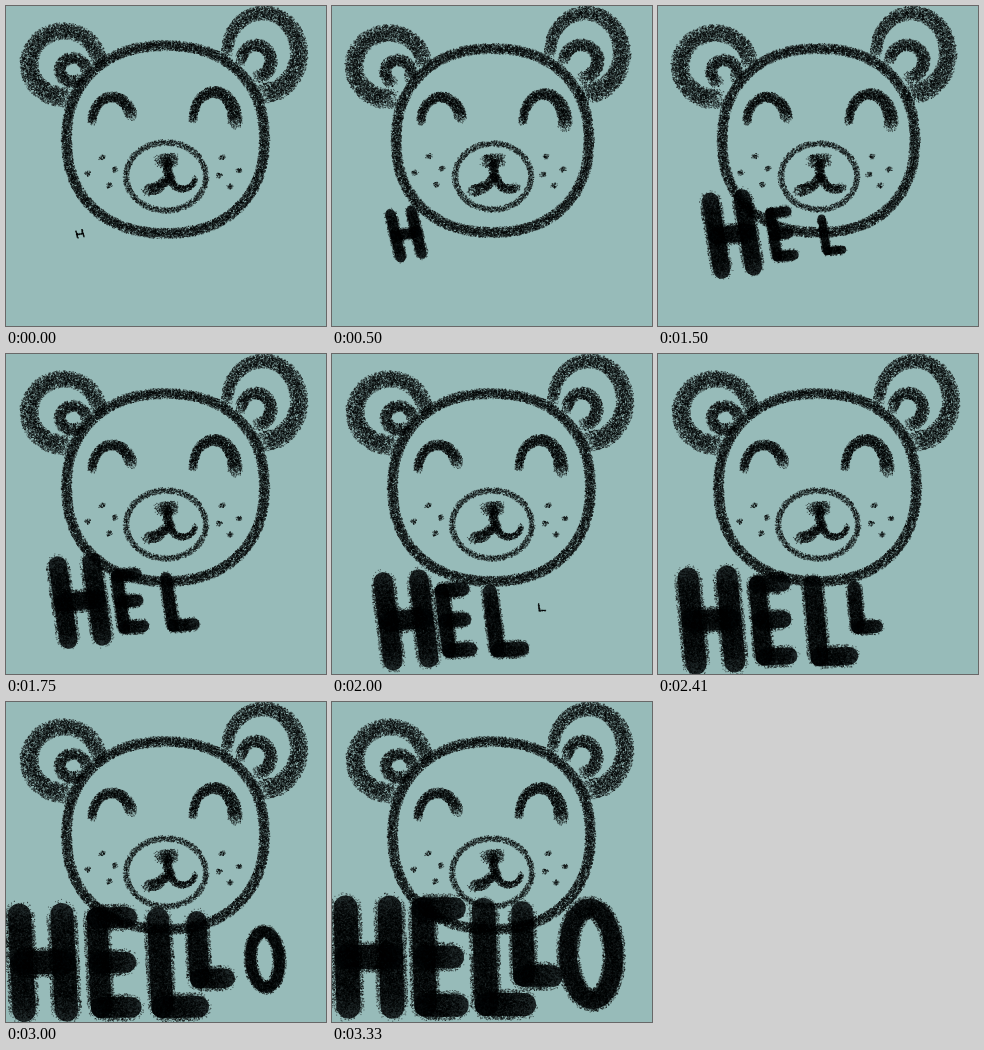
These frames come from a looping animation (320x320 px, 10000 ms). An HTML page with a canvas:

```html
<!DOCTYPE html>
<html lang="en">
<head>
<meta charset="utf-8">
<title>Bear says hello</title>
<style>
  html, body { margin: 0; width: 100%; height: 100%; overflow: hidden; background: #97bbb9; }
  canvas { display: block; width: 100vw; height: 100vh; }
</style>
</head>
<body>
<canvas id="stage" width="320" height="320"></canvas>
<script>
const SIZE = 320, LOOP = 10000, LAST = 40, GROWN = 39;
const PAPER = '#97bbb9', INK = '#020405', PI = Math.PI;
const ctx = document.getElementById('stage').getContext('2d');

const mix = (a, b, k) => a + (b - a) * k;
const ramp = (from, to, x) => Math.min(1, Math.max(0, (x - from) / (to - from)));

function random(seed) {
  return () => {
    seed = (seed + 0x6D2B79F5) | 0;
    let t = Math.imul(seed ^ (seed >>> 15), 1 | seed);
    t = (t + Math.imul(t ^ (t >>> 7), 61 | t)) ^ t;
    return ((t ^ (t >>> 14)) >>> 0) / 4294967296;
  };
}

// Part of an ellipse; a power below 1 makes it squarer
function arc(cx, cy, rx, ry, from = 0, to = 2 * PI, power = 1) {
  const bend = v => Math.sign(v) * Math.abs(v) ** power;
  return Array.from({ length: 49 }, (_, i) => {
    const a = mix(from, to, i / 48);
    return [cx + rx * bend(Math.cos(a)), cy + ry * bend(Math.sin(a))];
  });
}

// Grainy stroke: faint specks scattered in a disc that follows the path
function brush(g, rnd, pts, w0, w1 = w0, density = 3) {
  g.globalAlpha = 0.55;
  for (let i = 1; i < pts.length; i++) {
    const [x0, y0] = pts[i - 1], [x1, y1] = pts[i];
    const w = mix(w0, w1, i / pts.length);
    const count = Math.hypot(x1 - x0, y1 - y0) * w * density + rnd();
    for (let n = 1; n < count; n++) {
      const k = rnd(), a = rnd() * 2 * PI, r = w * 0.54 * Math.sqrt(rnd());
      g.fillRect(mix(x0, x1, k) + r * Math.cos(a) - 0.5, mix(y0, y1, k) + r * Math.sin(a) - 0.5, 1, 1);
    }
  }
  g.globalAlpha = 1;
}

// Sway is 0 or 1: the two drawings that alternate
function drawBear(sway) {
  const sheet = document.createElement('canvas');
  sheet.width = sheet.height = SIZE;
  const g = sheet.getContext('2d'), rnd = random(11 + sway);
  const stroke = (pts, ...look) => brush(g, rnd, pts, ...look);
  const s = (still, swayed) => mix(still, swayed, sway);
  g.fillStyle = PAPER;
  g.fillRect(0, 0, SIZE, SIZE);
  g.fillStyle = INK;

  // Head
  stroke(arc(s(159.5, 160.5), s(133.5, 134.5), s(99, 96.5), s(94, 92), 0, 2 * PI, 0.9), 10, 10, 2.4);

  // Ears
  stroke(arc(s(58, 57), s(58, 60), 35, 33, -0.1, -4.8), 15, 19, 2);
  stroke(arc(s(257, 254), 47, 36, 40, PI, 2.5 * PI), 11, 20, 2);
  stroke(arc(s(67, 66), s(64, 66), 13, 12, s(0, 0.5), s(-5.4, -4.2)), 11, 12, 2.4);
  stroke(arc(s(250, 249), 55, s(15, 17), 16, PI, 2.45 * PI), 11, 13, 2.4);

  // Eyes
  stroke(arc(s(106, 109), 116, 20, 25, PI, s(2 * PI - 0.3, 2 * PI - 0.15)), 8, 12);
  stroke(arc(s(208, 212), s(114, 116), 21, 28, PI, 2 * PI + 0.1), 8, 14);

  // Muzzle, nose and mouth
  stroke(arc(s(160, 161), 170.5, s(40, 38), s(34, 33)), 6, 6, 1.6);
  stroke([[154, 155], [168, 154]], 13);
  stroke([[163, 156], [161, 164], [164, 173]], 9);
  stroke([[163, 171], [153, 181], [141, 185]], 8, 13);
  stroke(arc(177, 172, 12, 11, PI, s(0, 0.9)), 8, s(5, 9));

  // Freckles
  const cheek = (pts, dx) => pts.forEach(([x, y]) =>
    stroke([[x + dx * sway - 1, y - sway], [x + dx * sway + 1, y - sway - 1]], 5, 5, 4));
  cheek([[96, 152], [82, 168], [103, 180], [109, 164]], 1);
  cheek([[216, 152], [213, 170], [233, 165], [224, 181]], -2);
  return sheet;
}

// Letter strokes in a unit box around 0,0
const line = (...p) => [[p[0], p[1]], [p[2], p[3]]];
const stem = line(-0.5, -0.5, -0.5, 0.5), foot = line(-0.5, 0.5, 0.5, 0.5);
const shapes = {
  H: [stem, line(0.5, -0.5, 0.5, 0.5), line(-0.5, 0, 0.5, 0)],
  E: [stem, line(-0.5, -0.5, 0.5, -0.5), line(-0.5, 0, 0.4, 0), foot],
  L: [stem, foot],
  O: [arc(0, 0, 0.5, 0.5)]
};

// Each letter is born 8 steps after the one before it
const word = [
  { char: 'H', from: 74, to: 37, rise: 0, w: 44, h: 99, pen: 30, ease: 0.5 },
  { char: 'E', from: 124, to: 108, rise: 0, w: 32, h: 97, pen: 28, ease: 0.8 },
  { char: 'L', from: 174, to: 172, rise: 0, w: 38, h: 95, pen: 29, ease: 0.5 },
  { char: 'L', from: 210, to: 205, rise: 13, w: 28, h: 64, pen: 27, ease: 0.5 },
  { char: 'O', from: 257, to: 259, rise: 3, w: 46, h: 93, pen: 22, ease: 1 }
];

function drawLetter(letter, index, step) {
  const born = index * 8;
  if (step < born) return;
  const grow = ramp(born, GROWN, step) ** letter.ease;
  const w = mix(6, letter.w, grow), h = mix(7, letter.h, grow), pen = mix(1.5, letter.pen, grow);
  const early = 1 - step / GROWN, lean = 0.03 + 0.25 * early, tilt = -0.2 * early;
  const cx = mix(letter.from, letter.to, ramp(24, 33, step));
  const cy = 228 + 38 * ramp(18, 24, step) - 11 * ramp(33, GROWN, step) - letter.rise;
  const rnd = random(step * 7 + index * 997);

  for (const part of shapes[letter.char]) {
    const pts = part.map(([u, v]) => [cx + u * w + v * h * lean, cy + u * w * tilt + v * h]);
    ctx.globalAlpha = 0.8;
    ctx.lineWidth = pen * 0.8;
    ctx.beginPath();
    pts.forEach(([x, y]) => ctx.lineTo(x, y));
    ctx.stroke();
    brush(ctx, rnd, pts, pen, pen, 2);
  }
}

const bears = [0, 1].map(drawBear);
ctx.lineCap = ctx.lineJoin = 'round';
ctx.strokeStyle = ctx.fillStyle = INK;

function render(step) {
  ctx.globalAlpha = 1;
  ctx.drawImage(bears[Math.floor(step / 2) % 2], 0, 0);
  word.forEach((letter, i) => drawLetter(letter, i, Math.min(step, GROWN)));
}

// Twelve steps per second, rounded down to 10 ms
function stepAt(ms) {
  const ticks = Math.floor(ms / 10) + 1;
  return Math.min(LAST, Math.ceil(ticks * 3 / 25) - 1);
}

const start = performance.now();
let shown = -1;
function tick() {
  const step = stepAt((performance.now() - start) % LOOP);
  if (step !== shown) render(shown = step);
  requestAnimationFrame(tick);
}
tick();
</script>
</body>
</html>
```
